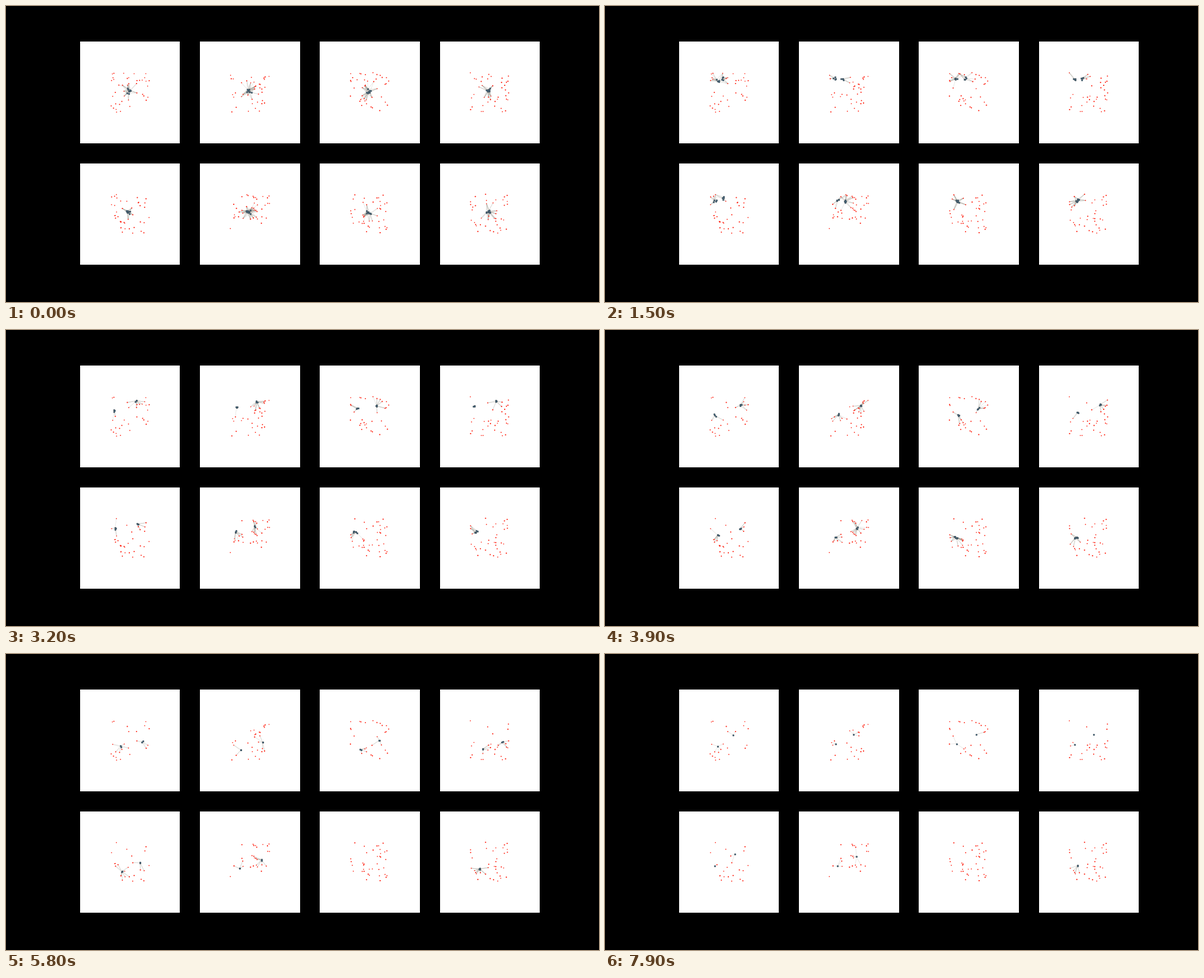
A matplotlib script that plays this animation: 1000 by 500 pixels, repeating every 8 s.

```python
import numpy as np
import matplotlib.pyplot as plt
from matplotlib.animation import FuncAnimation
from matplotlib.collections import LineCollection
from matplotlib.patches import Rectangle

W, H, DPI = 1000, 500, 100
FRAMES, STEP = 80, 100
COLS, PITCH, PANEL_W = 4, 202.17, 168.48
FOOD, REACH = 43, 33.5     # food count and half width of the food square
SIGHT, BITE = 16, 4.5
TEAM = 4

# Both teams leave the middle together, then take different routes.
KEY_TIMES = [0, 0.8, 2.3, 3.2, 4.6, 5.8, 7.9]
LEFT_ROUTE = [(-2, -3), (-15, -17), (-28, -26), (-25, -13), (-16, 6), (-14, 13), (-21, 8)]
RIGHT_ROUTE = [(-2, -3), (-14, -17), (-3, -31), (10, -22), (24, -12), (19, 0), (10, -10)]

rng = np.random.default_rng(11)


def along(route, t):
    x, y = zip(*route)
    return np.array([np.interp(t, KEY_TIMES, x), np.interp(t, KEY_TIMES, y)])


class Swarm:
    def __init__(self, center, routes, end=9):
        self.center = np.array(center)
        self.routes, self.end = routes, end
        self.food = rng.uniform(-REACH, REACH, (FOOD, 2))
        self.size = rng.uniform(1.2, 2.4, FOOD)
        self.offsets = rng.uniform(-1, 1, (2, TEAM, 2))
        self.phase = rng.uniform(0, 2 * np.pi, (2, TEAM))
        self.eaten = np.full(FOOD, FRAMES)
        for f in range(FRAMES):
            agents = self.agents(f)
            if len(agents):
                near = self.gaps(agents).min(axis=0) < BITE
                self.eaten[near] = np.minimum(self.eaten[near], f)

    def agents(self, f):
        """Teams follow their routes, wander a little and lose members."""
        t = f * STEP / 1000
        if t > self.end:
            return np.empty((0, 2))
        spread = 1 + 2.2 * np.exp(-t / 2.5)
        alive = max(1, TEAM - int(t / 2.1))
        found = []
        for g, route in enumerate(self.routes):
            a = self.phase[g, 0]
            drift = 3 * min(t, 1) * np.array([np.cos(a + t), np.sin(a + t)])
            for k in range(alive):
                b = self.phase[g, k] + 3 * t
                wobble = 0.5 * np.array([np.cos(b), np.sin(b)])
                found.append(along(route, t) + drift + spread * (self.offsets[g, k] + wobble))
        return np.array(found)

    def gaps(self, agents):
        return np.linalg.norm(agents[:, None] - self.food[None], axis=2)

    def state(self, f):
        """Agents, remaining food, food sizes and sight lines on the stage."""
        left = self.eaten > f
        agents = self.agents(f)
        lines = []
        if len(agents):
            for i, j in np.argwhere((self.gaps(agents) < SIGHT) & left):
                lines.append([agents[i] + self.center, self.food[j] + self.center])
        return agents + self.center, self.food[left] + self.center, self.size[left], lines


fig = plt.figure(figsize=(W / DPI, H / DPI), dpi=DPI, facecolor="black")
ax = fig.add_axes([0, 0, 1, 1])
ax.set_xlim(0, W)
ax.set_ylim(H, 0)
ax.axis("off")

swarms = []
for top, bottom in ((60, 232), (266, 437)):
    for col in range(COLS):
        x = 125 + PITCH * col
        left, right = round(x), round(x + PANEL_W)
        ax.add_patch(Rectangle((left, top), right - left, bottom - top, fc="white", lw=0))
        # The last two swarms stay in one group; the first of them dies out.
        n = len(swarms)
        routes = [LEFT_ROUTE, RIGHT_ROUTE if n < 6 else LEFT_ROUTE]
        swarms.append(Swarm((x + PANEL_W / 2, (top + bottom) / 2), routes,
                            end=5 if n == 6 else 9))

rays = ax.add_collection(LineCollection([], colors="#8c877a", linewidths=0.4, alpha=0.3))
food_dots = ax.scatter([], [], c="#ff2010", linewidths=0, zorder=3)
agent_dots = ax.scatter([], [], s=3.6, c="#2f6689", edgecolors="#505050",
                        linewidths=0.4, zorder=4)


def draw(f):
    agents, food, sizes, lines = zip(*(s.state(f) for s in swarms))
    agent_dots.set_offsets(np.concatenate(agents))
    food_dots.set_offsets(np.concatenate(food))
    food_dots.set_sizes(np.concatenate(sizes))
    rays.set_segments(sum(lines, []))
    return rays, food_dots, agent_dots


anim = FuncAnimation(fig, draw, frames=FRAMES, interval=STEP, repeat=True, repeat_delay=0)
plt.show()
```
